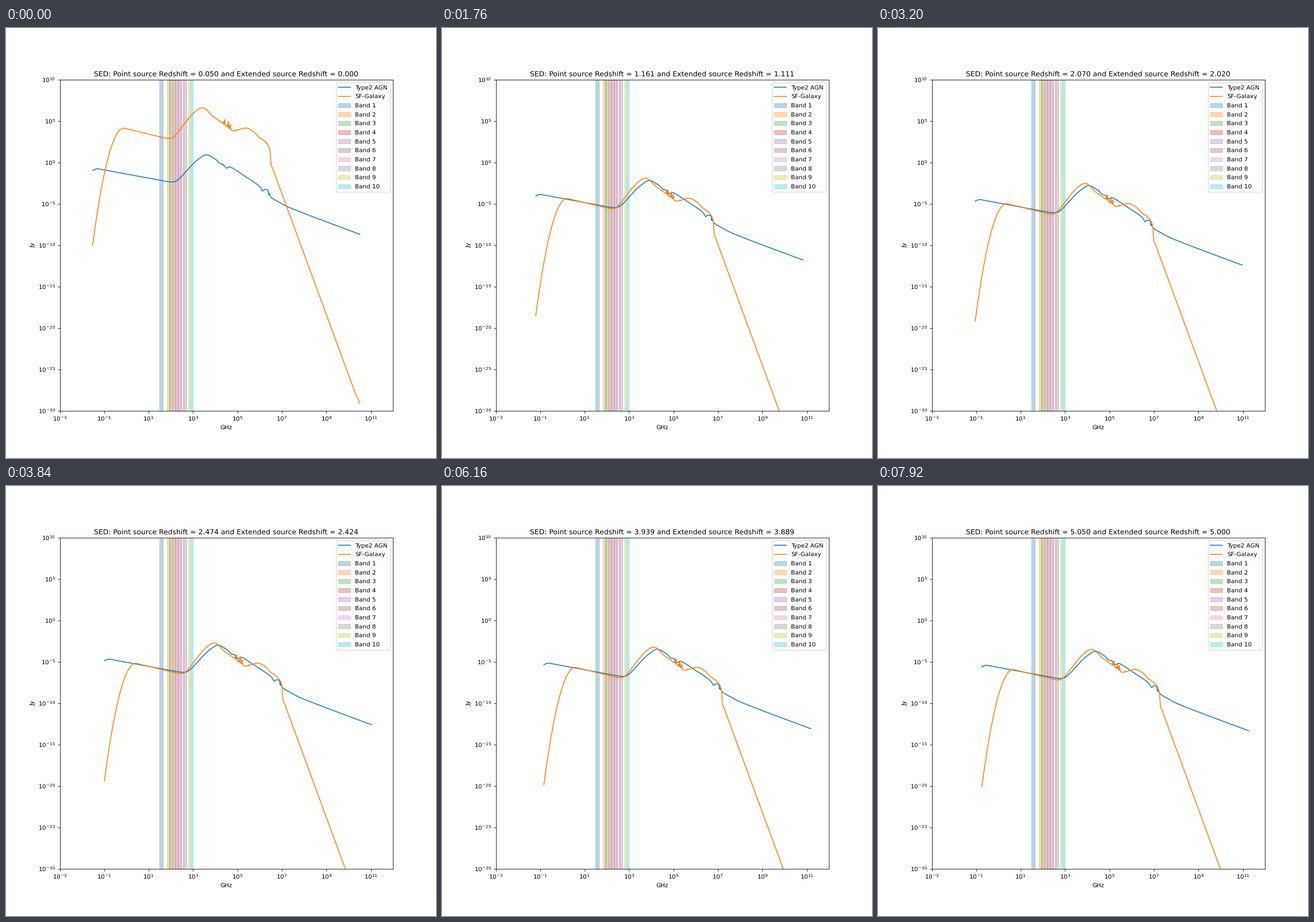
A matplotlib script for the animation above (8 s loop, 748x748 px).

```python
import matplotlib.pyplot as plt
import numpy as np
from matplotlib.animation import FuncAnimation

plt.rcParams["text.hinting"] = "no_hinting"

FRAMES, INTERVAL = 100, 80
SIZE, DPI = 748, 74.8
POINT_OFFSET = 0.05
Z_START, Z_END = 1e-4, 5
LIGHT_SPEED = 2.998e5  # GHz times micron

BANDS = [(31, 45), (67, 90), (84, 116), (125, 163), (163, 211),
         (211, 275), (275, 373), (385, 500), (602, 720), (787, 950)]

# Key points of the optical to X-ray continuum: log GHz, log Jy.
AGN_KNOTS = [(4.05, 0.31), (4.21, -0.15), (4.335, -0.225), (4.516, -0.70),
             (4.62, -0.54), (4.98, -1.04), (5.34, -1.68), (5.73, -2.36),
             (6.02, -2.97), (6.146, -3.46), (6.21, -3.27), (6.34, -3.30),
             (6.50, -4.18), (6.845, -4.76), (7.21, -5.30), (7.91, -6.07),
             (10.506, -8.684)]
GALAXY_KNOTS = [(4.31, 4.77), (4.62, 4.115), (4.80, 3.80), (5.37, 4.15),
                (5.73, 3.70), (5.965, 3.04), (6.224, 2.57), (6.405, 1.93),
                (6.47, 1.30), (6.522, -0.43), (6.56, -0.57), (6.65, -1.23),
                (10.25, -27.48), (10.35, -28.21), (10.453, -28.70),
                (10.474, -29.11)]

# Emission features: wavelength in micron, height in dex.
PAH_LINES = [(12.7, 0.3), (11.3, 0.65), (8.6, 0.25), (7.7, 0.75),
             (6.4, 0.6), (3.3, 0.1)]
AGN_LINES = [(0.119, -0.35)]


def radio(u, level, slope, cut, steep):
    """Power law that is absorbed below the cut."""
    return level + slope * u - steep * np.maximum(0, cut - u) ** 2


def dust(u, peak, level, beta, warm, cutoff):
    """Grey body plus a warm power law, as log flux."""
    n = 3 + beta
    top = n * (1 - np.exp(-n))
    nu = 10 ** (np.minimum(u, peak + 1.5) - peak)
    grey = nu ** n * np.expm1(top) / np.expm1(top * nu)
    return level + np.log10(grey + warm / nu ** 2 * np.exp(-cutoff / nu ** 2)
                            + 1e-30)


def through(u, knots):
    """Monotone cubic curve through the key points."""
    x, y = np.array(knots).T
    h = np.diff(x)
    d = np.diff(y) / h
    turning = d[1:] * d[:-1] <= 0
    total = np.where(turning, 1, d[1:] + d[:-1])
    inner = np.where(turning, 0, 2 * d[1:] * d[:-1] / total)
    slope = np.concatenate([d[:1], inner, d[-1:]])
    i = np.clip(np.searchsorted(x, u) - 1, 0, len(h) - 1)
    t = np.clip((u - x[i]) / h[i], 0, 1)
    return (y[i] + (y[i + 1] - y[i]) * t * t * (3 - 2 * t)
            + h[i] * t * (1 - t) * (slope[i] * (1 - t) - slope[i + 1] * t))


def spectrum(start, radio_args, dust_args, knots, lines):
    u = np.linspace(start, knots[-1][0], 4000)
    cold = np.log10(10 ** radio(u, *radio_args) + 10 ** dust(u, *dust_args))
    v = np.where(u < knots[0][0], cold, through(u, knots))
    for wavelength, height in lines:
        center = np.log10(LIGHT_SPEED / wavelength)
        v += height * np.exp(-((u - center) / 0.014) ** 2)
    return u, v


def log_distance(z):
    """log10 of luminosity distance in a flat universe, up to a constant."""
    s = np.linspace(0, z, 800)
    f = 1 / np.sqrt(0.3 * (1 + s) ** 3 + 0.7)
    return np.log10((1 + z) * np.sum((f[1:] + f[:-1]) / 2) * (s[1] - s[0]))


def shifted(logs, z, z0):
    u, v = logs
    return (10 ** (u + np.log10((1 + z) / (1 + z0))),
            10 ** (v - 2 * (log_distance(z) - log_distance(z0))))


agn = spectrum(-1.507, (-1.41, -0.5, -1.24, 4.35),
               (3.507, 0.647, 1.5, 6.55, 2.3), AGN_KNOTS, AGN_LINES)
galaxy = spectrum(-1.525, (4.072, -0.655, -0.07, 7.15),
                  (3.391, 6.521, 2, 1.28, 2.25), GALAXY_KNOTS, PAH_LINES)
redshifts = np.linspace(Z_START, Z_END, FRAMES)

fig, ax = plt.subplots(figsize=(SIZE / DPI, SIZE / DPI), dpi=DPI)
ax.set_xscale("log")
ax.set_yscale("log")
agn_line, = ax.plot([], [], label="Type2 AGN")
galaxy_line, = ax.plot([], [], label="SF-Galaxy")
for i, (low, high) in enumerate(BANDS):
    ax.axvspan(low, high, color=f"C{i}", alpha=0.3, label=f"Band {i + 1}")
ax.set_xlim(1e-3, 1e12)
ax.set_ylim(1e-30, 1e10)
ax.set_xticks([10.0 ** k for k in range(-3, 12, 2)])
ax.set_yticks([10.0 ** k for k in range(-30, 11, 5)])
ax.minorticks_off()
ax.set_xlabel("GHz")
ax.set_ylabel("Jy")
ax.legend(loc="upper right", labelspacing=0.576)
title = ax.set_title("", fontsize=11.95)


def update(frame):
    z = redshifts[frame]
    z_point = z + POINT_OFFSET
    agn_line.set_data(*shifted(agn, z_point, Z_START + POINT_OFFSET))
    galaxy_line.set_data(*shifted(galaxy, z, Z_START))
    title.set_text(f"SED: Point source Redshift = {z_point:.3f} "
                   f"and Extended source Redshift = {z:.3f}")
    return agn_line, galaxy_line, title


anim = FuncAnimation(fig, update, frames=FRAMES, interval=INTERVAL,
                     repeat=True, repeat_delay=0, blit=False)
plt.show()
```
